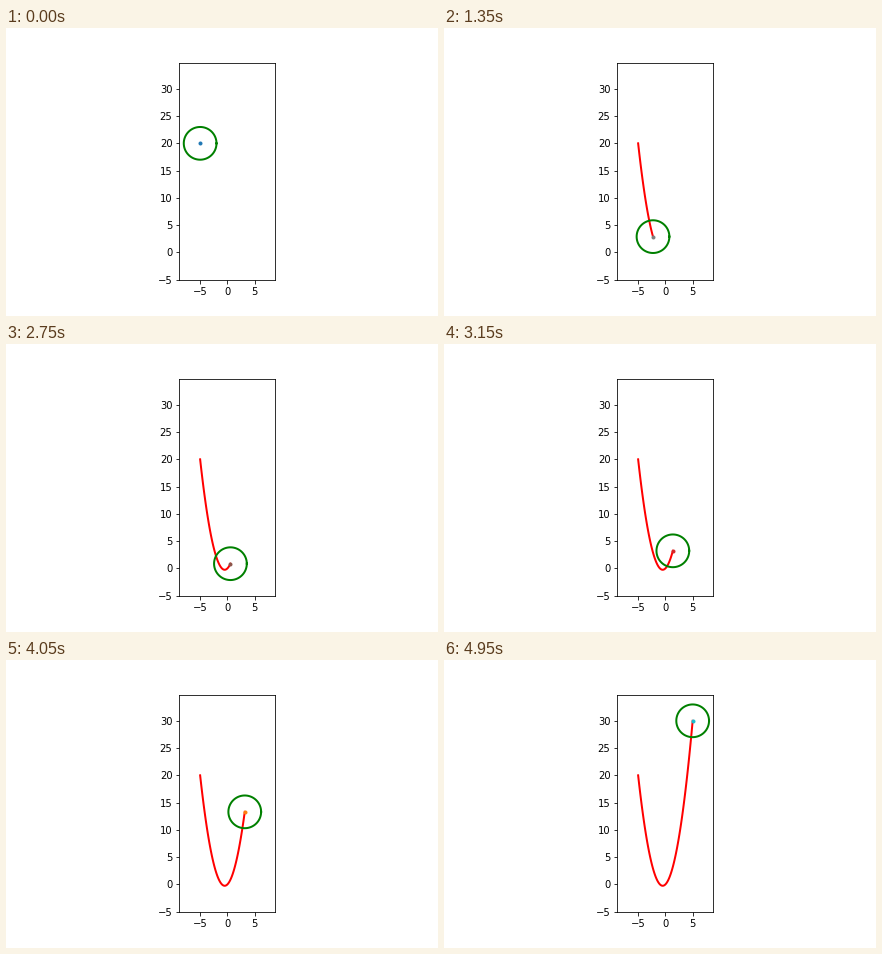
A matplotlib script for the animation above (5000 ms loop, 432 by 288 pixels).

```python
import numpy as np
import matplotlib.pyplot as plt
from matplotlib.animation import FuncAnimation

FRAMES = 100
RADIUS = 3
MARGIN = 0.05

x = np.linspace(-5, 5, FRAMES)
y = x**2 + x
theta = np.linspace(0, 2 * np.pi, 100)
ring_x = RADIUS * np.cos(theta)
ring_y = RADIUS * np.sin(theta)


def padded_limits(values):
    """Range swept by the ring's centre plus its radius and a margin."""
    low, high = values.min() - RADIUS, values.max() + RADIUS
    pad = MARGIN * (high - low)
    return low - pad, high + pad


fig, ax = plt.subplots(figsize=(6, 4), dpi=72, facecolor="white")
fig.subplots_adjust(left=0.125, right=0.9, bottom=0.125, top=0.88)
ax.set_aspect("equal")
ax.set_xlim(*padded_limits(x))
ax.set_ylim(*padded_limits(y))
ax.set_xticks([-5, 0, 5])
ax.set_yticks(range(-5, 31, 5))

trail, = ax.plot([], [], color="red", lw=2)
ring, = ax.plot([], [], color="green", lw=2)
dot, = ax.plot([], [], ".", color="C0")


def update(i):
    trail.set_data(x[:i + 1], y[:i + 1])
    ring.set_data(x[i] + ring_x, y[i] + ring_y)
    dot.set_data([x[i]], [y[i]])
    dot.set_color(f"C{i % 10}")
    return trail, ring, dot


anim = FuncAnimation(fig, update, frames=FRAMES, interval=50,
                     repeat=True, repeat_delay=0)
plt.show()
```
